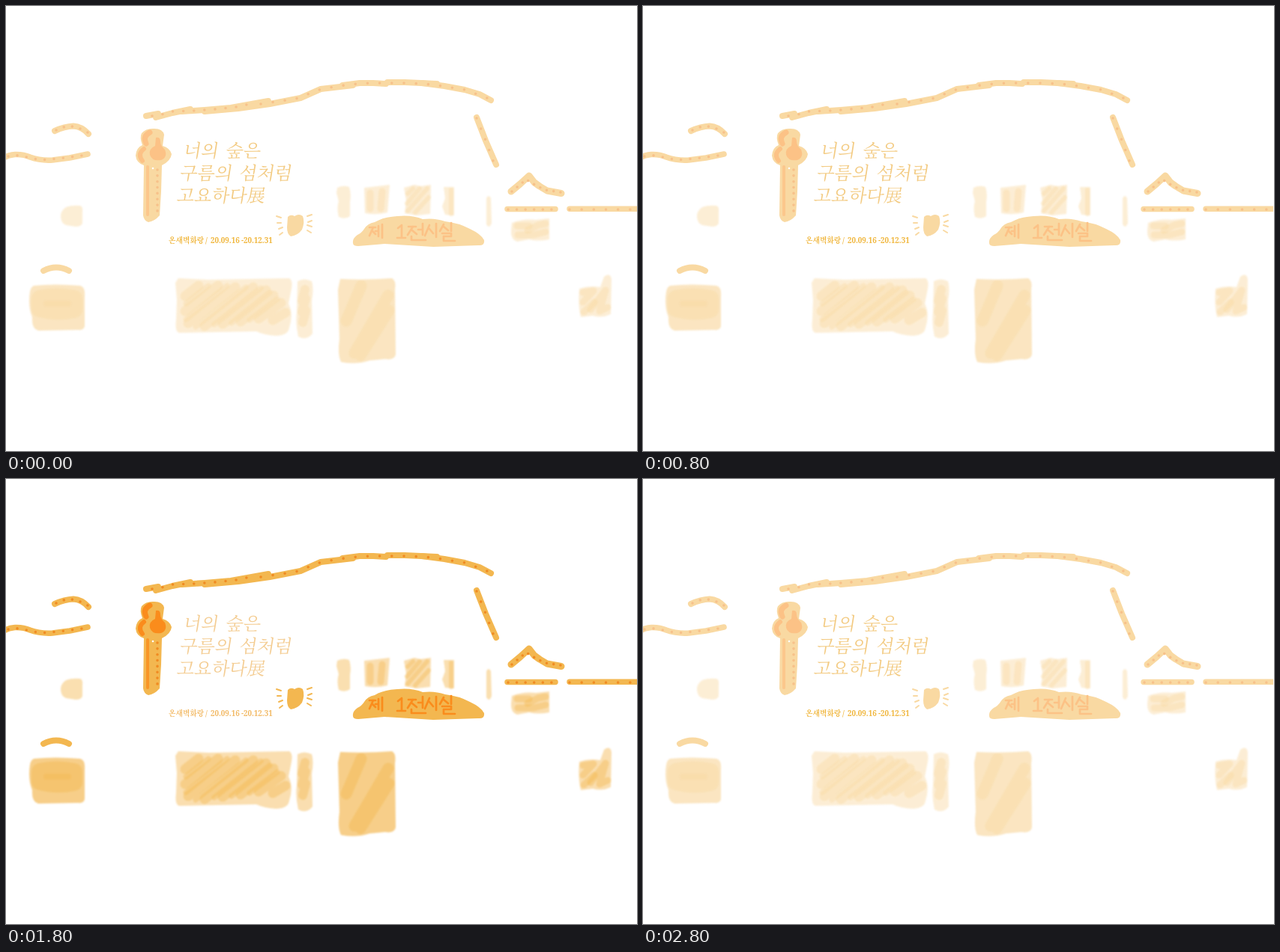
An HTML page for the animation above (3 s loop, 842 px wide and 595 px high).

```html
<!DOCTYPE html>
<html lang="ko">
<head>
<meta charset="utf-8">
<title>전시 안내</title>
<style>
  html, body { margin: 0; width: 100%; height: 100%; overflow: hidden; background: #fff; }
  svg { display: block; width: 842px; height: 595px; animation: pulse 3s step-end infinite; }

  .ink {
    --main: #f3b750;
    --accent: #fa8c1c;
    opacity: var(--glow);
    transform: translateX(var(--shift));
  }
  .solid { fill: var(--main); }
  .accent { fill: var(--accent); }
  .line, .dots, .mark, .wash path { fill: none; stroke-linecap: round; stroke-linejoin: round; }
  .line { stroke: var(--main); stroke-width: 8; }
  .mark { stroke: var(--accent); }
  .dots { stroke: #f08b22; stroke-width: 3.6; stroke-dasharray: 0 1; }
  .wash { stroke: var(--main); stroke-width: 0; }
  .wash .pale { fill: var(--main); opacity: .45; }
  .wash .mid { fill: var(--main); opacity: .68; }
  .wash .brush { opacity: .42; }

  .title { fill: var(--title); font: 500 24.2px "Noto Serif CJK KR", "Noto Sans CJK KR", "Noto Sans CJK", serif; word-spacing: 2px; }
  .date { fill: var(--date); font: 600 9.8px "Noto Serif", "Noto Serif CJK KR", "Noto Sans CJK KR", serif; }

  /* Fifteen beats of 200 ms; the first and last are both faint. */
  @keyframes pulse {
    0% { --glow: .53; --shift: 0px; --title: #f3cb83; --date: #f0b63c; }
    6.666%, 19.999%, 33.333%, 46.666%, 59.999%, 73.333%, 86.666% {
      --glow: 1; --shift: 0px; --title: #f4cd93; --date: #f2b964;
    }
    13.333%, 26.666%, 39.999%, 53.333%, 66.666%, 79.999%, 93.333% {
      --glow: .53; --shift: -1px; --title: #f3cb83; --date: #f0b63c;
    }
  }
</style>
</head>
<body>
<svg viewBox="0 0 842 595">
  <defs>
    <filter id="soft" x="-5%" y="-5%" width="110%" height="110%"><feGaussianBlur stdDeviation="1.1"/></filter>
    <filter id="edge" x="-5%" y="-5%" width="110%" height="110%"><feGaussianBlur stdDeviation=".35"/></filter>
    <clipPath id="stage"><path d="M0 0h842v595H0z"/></clipPath>
  </defs>

  <g class="ink" clip-path="url(#stage)">
    <!-- washed windows and doors -->
    <g class="wash" filter="url(#soft)">
      <path class="pale" d="M80 269Q88 266 99 267Q103 268 102 276V290Q101 295 93 295L80 293Q73 290 73 281Q73 274 80 269Z"/>
      <path class="pale" d="M442 243Q450 239 458 242Q461 252 459 262V281Q452 286 444 282Q441 270 444 261L441 250Z"/>

      <path class="pale" d="M478 243L512 239L509 276Q495 280 479 277Z"/>
      <path class="brush" stroke-width="9" d="M486 250V271M502 248L500 271"/>

      <path class="pale" d="M531 243L545 239L553 241L567 239L566 278L548 280L532 277L534 260Z"/>
      <path class="brush" stroke-width="6" d="M536 251L543 244M535 264L552 244M536 274L562 244M546 276L564 256"/>

      <path class="pale" d="M584 242H598V280L586 279L582 268L586 257Z"/>
      <path class="brush" stroke-width="6" d="M594 246V278"/>
      <path class="pale" d="M641 257Q644 251 647 257L648 290Q645 299 641 292Z"/>

      <path class="pale" d="M675 290Q690 284 707 286L725 284V312Q710 315 698 312L682 315Q673 312 674 300Z"/>
      <path class="brush" stroke-width="9" d="M682 294H698M683 306H704L720 302"/>
      <path class="brush" stroke-width="9" d="M696 300L710 293L720 291"/>

      <path class="pale" d="M765 378Q778 373 793 376L798 362Q806 356 808 365L807 412Q795 418 783 414L767 416Q763 400 765 378Z"/>
      <path class="brush" stroke-width="9" d="M770 383L784 381L770 396M771 409L785 396"/>
      <path class="brush" stroke-width="9" d="M780 406L800 380L792 408L803 403"/>

      <path class="mid" d="M37 374Q65 371 99 374Q106 376 105 388V428Q104 434 96 433L43 434Q34 432 35 416Q29 401 32 382Q33 376 37 374Z"/>
      <path class="brush" stroke-width="22" d="M45 391Q67 386 91 391V406Q67 411 45 405Z"/>
      <path class="brush" stroke-width="8" d="M54 398H83"/>

      <path class="pale" d="M230 364L270 366L378 364Q383 367 381 378L377 398Q384 412 378 430Q377 440 361 441Q344 440 334 435L231 437Q225 435 227 420L228 393L226 370Z"/>
      <path class="brush" stroke-width="13" d="M239 388L257 374M239 408L283 374M243 424L306 376M265 428L330 376M289 425L347 380M313 422L357 387M337 418L367 397M356 420L373 410"/>
      <path class="brush" stroke-width="7" d="M240 398L270 374M240 419L295 374M253 429L320 376M278 426L340 377M301 424L352 383M325 420L362 392"/>

      <path class="pale" d="M389 368Q398 363 408 368Q411 378 408 394L409 438Q401 448 390 442Q386 424 388 410Z"/>
      <path class="brush" stroke-width="12" d="M399 379L395 394L400 391L395 409L400 407L396 423"/>

      <path class="mid" d="M446 365Q480 367 515 364Q521 367 519 380L520 466Q518 474 506 472L485 474Q468 480 447 476Q442 466 445 445L443 379Z"/>
      <path class="brush" stroke-width="15" d="M474 374L454 421M510 387L465 464M511 407L473 467"/>
    </g>

    <g filter="url(#edge)">
      <!-- rooflines -->
      <g class="line">
        <g transform="translate(0 1)">
          <path d="M187 146L203 143M200 148L222 142L246 137M235 140L265 138L300 135L350 126"/>
          <path d="M265 140L310 136L352 130L393 122L420 110L463 105M449 105L472 102L490 102L507 103M509 101H532L575 103"/>
          <path d="M555 102L585 106L612 111L632 117L647 125"/>
        </g>
        <path d="M65 167Q78 161 90 160.5Q101 161 110 171"/>
        <path d="M-3 203Q4 199 12 198.5Q23 198 32 202Q46 207 62 206L85 203L109 198" style="stroke-width:7.5"/>
        <path d="M628 149L640 180L654 212"/>
        <path d="M674 248L686 238L698 227L705 236L712 241L722 247L741 250.5" style="stroke-width:9"/>
        <path class="solid" stroke="none" d="M686 237L698 223L706 236L697 234Z"/>
        <path d="M669 271.5H733M752 271.3H846" style="stroke-width:7.5"/>
        <path d="M50 354Q67 345 84 354"/>
      </g>
      <g class="dots">
        <path pathLength="9.01" d="M195 147L208 145L222 141L250 140L278 138L307 135L321 132"/>
        <path pathLength="19.01" d="M340 131L387 124L421 111L457 105L486 103L537 103L569 105L613 112L642 123"/>
        <path pathLength="4.01" d="M67 166L76 162L90 161L102 165L109 169"/>
        <path pathLength="8.01" d="M3 201L10 199L33 203L46 206L71 204L101 200"/>
        <path pathLength="4.01" d="M628 150L639 177L650 207"/>
        <path pathLength="8.01" d="M675 248L694 232L709 241L720 246L740 249"/>
        <path pathLength="5.01" d="M670 272H728"/>
        <path pathLength="5.01" d="M752 272H833"/>
      </g>

      <!-- torch -->
      <path class="solid" d="M181 170Q187 163 198 164Q209 164 211 172L209 187Q219 190 221 198Q220 207 208 213L207 248L205 280Q198 288 190 289Q184 287 183 280L184 213Q174 210 173 200Q174 189 182 186Q178 176 181 170Z"/>
      <path class="mark" stroke-width="7" d="M187 184Q182 174 192 169"/>
      <path class="mark" stroke-width="6" d="M184 191Q175 198 182 207"/>
      <path class="accent" d="M200 176Q206 175 206 181Q206 187 212 192Q216 202 207 206Q195 208 192 199Q190 191 199 187Z"/>
      <path class="mark" stroke-width="4" opacity=".8" d="M189 215V279"/>
      <path class="dots" pathLength="7.01" d="M202 219V274"/>
      <circle cx="196" cy="217" r="1.3" fill="#fff"/>

      <!-- lamp -->
      <path class="solid" d="M376 282Q380 278 385 281Q391 277 396 281Q399 289 395 299Q389 307 380 308Q375 305 375 296Z"/>
      <path class="line" style="stroke-width:2" d="M361 281L367 283M362 290H367M364 298L369 296M365 306L369 303M402 281L408 279M403 289L408 287M402 293L408 295M402 300L407 303"/>

      <!-- sign -->
      <path class="solid" d="M463 317Q462 311 469 306Q475 303 478 298Q482 291 492 289Q504 282 522 281Q542 279 556 285Q572 283 586 288Q604 290 619 298Q634 305 638 313Q639 321 630 320L570 322L505 318L470 321Q463 321 463 317Z"/>
      <g class="mark" stroke-width="2.7" role="img" aria-label="제 1전시실">
        <path d="M485 296H493M490 296L485 307M488 300L493 305M493 301H497M497 294V308M502 292V310"/>
        <path d="M523 297L528 293V310M522 310H533"/>
        <path d="M537 295H547M543 295L536 306M542 300L548 305M550 299H555M556 291V306M541 308V313H560"/>
        <path d="M565 293L559 307M565 298L570 304M574 291V309"/>
        <path d="M584 292L579 301M584 295L590 300M594 290V301M582 304H594V308H584V314H599"/>
      </g>
    </g>
  </g>

  <g class="title" filter="url(#edge)">
    <text transform="translate(236 202) skewX(-9)">너의 숲은</text>
    <text transform="translate(231 232) skewX(-9)">구름의 섬처럼</text>
    <text transform="translate(227 262) skewX(-9)">고요하다展</text>
  </g>
  <text class="date" y="317"><tspan x="217">온새벽화랑</tspan><tspan x="266">/</tspan><tspan x="273">20.09.16</tspan><tspan x="314">-20.12.31</tspan></text>
</svg>
</body>
</html>
```
